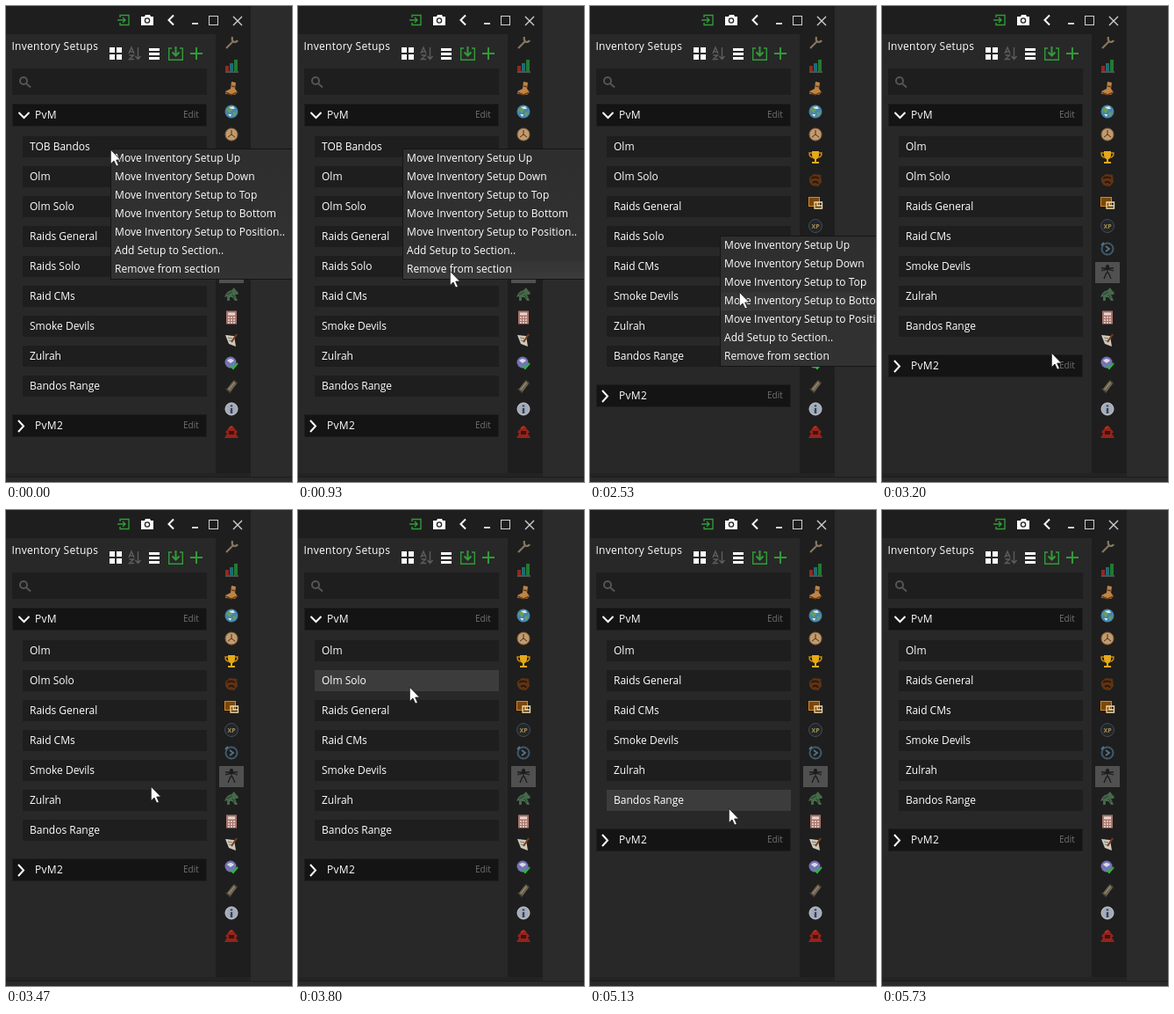
Animation of 326x541 px, one loop 6670 ms. Source, as an HTML page:

```html
<!DOCTYPE html>
<html lang="en">
<head>
<meta charset="utf-8">
<title>Inventory Setups</title>
<style>
  html, body { margin: 0; width: 100%; height: 100%; overflow: hidden; background: #282828; }
  svg { display: block; }
  text { font: 12px "Open Sans", "Noto Sans", sans-serif; fill: #fff; }
  #menu text { letter-spacing: .07px; }
  .edit { font-size: 10px; fill: #707070; }
  .line { fill: none; stroke-width: 2; }
  .thin { stroke-width: 1.4; }
  .white { stroke: #fff; }
  .green { stroke: #339a3a; }
  .head { fill: #141414; stroke: #1e1e1e; }
</style>
</head>
<body>
<svg id="stage" width="326" height="541" viewBox="0 0 326 541">
  <defs>
    <linearGradient id="menuFill" x2="0" y2="1">
      <stop stop-color="#2e2e2e"/><stop offset="1" stop-color="#323232"/>
    </linearGradient>
    <linearGradient id="pickFill" x2="0" y2="1">
      <stop stop-color="#343434"/><stop offset="1" stop-color="#3b3b3b"/>
    </linearGradient>
  </defs>

  <rect width="326" height="541" fill="#2b2b2b"/>
  <rect width="279" height="531" fill="#1e1e1e"/>
  <rect y="32" width="239" height="499" fill="#282828"/>
  <rect y="531" width="279" height="4" fill="#232323"/>
  <rect y="535" width="326" height="1" fill="#1c1c1c"/>

  <!-- title bar -->
  <path class="line thin green" d="M130 13V10.5H140V21.5H130V19M127 16H136M133 13L136 16L133 19"/>
  <path fill="#fff" d="M154 12H158L159 10H164L165 12H168V22H154Z"/>
  <circle cx="161" cy="16.500" r="2.600" fill="#fff" stroke="#1e1e1e" stroke-width="1.300"/>
  <path class="line white" d="M191 10.500L185.500 16L191 21.500"/>
  <path class="line" stroke="#d0d0d0" d="M212 20H219"/>
  <rect x="231.500" y="11.500" width="10" height="10" fill="none" stroke="#d0d0d0"/>
  <path class="line thin" stroke="#d0d0d0" d="M259 12L269 22M269 12L259 22"/>

  <!-- panel header -->
  <text x="6.500" y="50" letter-spacing=".27">Inventory Setups</text>
  <path fill="#fff" d="M118 47h6v6h-6zM126 47h6v6h-6zM118 55h6v6h-6zM126 55h6v6h-6zM163 48h12v3h-12zM163 53h12v3h-12zM163 58h12v3h-12z"/>
  <path class="line thin" stroke="#5c5c5c" d="M140 54L143 47L146 54M141 52H145M140.500 56H145.500L140.500 60.500H146M150.500 47V60M147.500 57L150.500 60.500L153.500 57"/>
  <path class="line thin green" d="M189 48H185.700V61.300H201.300V48H198"/>
  <path class="line green" d="M193.500 46V56M189.500 52.500L193.500 56.500L197.500 52.500M217 47V61M210 54H224"/>
  <rect x="7" y="71" width="222" height="30" fill="#1e1e1e"/>
  <g class="line" stroke="#555"><circle cx="20" cy="85" r="4"/><path d="M23 88L28 92.500"/></g>

  <!-- sections -->
  <g id="open">
    <rect class="head" x="7.500" y="111.500" width="221" height="25"/>
    <path class="line white" d="M14.500 121L20.500 127L26.500 121"/>
    <text x="33" y="128" letter-spacing=".3">PvM</text>
    <text class="edit" x="202" y="127">Edit</text>
  </g>
  <g id="rows"></g>
  <g id="closed">
    <rect class="head" x="7.500" y="-.5" width="221" height="25"/>
    <path class="line white" d="M14 6L20 12.500L14 19"/>
    <text x="33" y="16" letter-spacing=".3">PvM2</text>
    <text class="edit" x="202" y="15">Edit</text>
  </g>

  <rect x="243" y="291" width="28" height="24" fill="#505050"/>
  <g id="tools"></g>

  <g id="menu">
    <rect x=".5" y="-.5" width="215" height="148" fill="url(#menuFill)" stroke="#151515"/>
    <rect id="pick" x="1" width="214" height="21" fill="url(#pickFill)"/>
  </g>
  <path id="cursor" fill="#fff" stroke="#161616" stroke-width=".8" d="M.3 .3V16.500L4 13L6.800 19L9.400 18L6.700 12H11.600Z"/>
</svg>

<script>
const NS = "http://www.w3.org/2000/svg";
const TICK = 200 / 3, LOOP = 6670;
const PITCH = 34, ROW_TOP = 148, ROW_H = 24, ITEM_H = 21;
const $ = id => document.getElementById(id);

function add(parent, tag, attrs, label) {
  const el = document.createElementNS(NS, tag);
  for (const k in attrs) el.setAttribute(k, attrs[k]);
  if (label) el.textContent = label;
  parent.append(el);
  return el;
}
const place = (el, x, y) => el.setAttribute("transform", `translate(${x} ${y})`);
const show = (el, on) => el.setAttribute("visibility", on ? "visible" : "hidden");

const setups = ["TOB Bandos", "Olm", "Olm Solo", "Raids General", "Raids Solo",
  "Raid CMs", "Smoke Devils", "Zulrah", "Bandos Range"];
const removals = { "TOB Bandos": 22, "Raids Solo": 48, "Olm Solo": 68 };
const actions = ["Move Inventory Setup Up", "Move Inventory Setup Down", "Move Inventory Setup to Top",
  "Move Inventory Setup to Bottom", "Move Inventory Setup to Position..", "Add Setup to Section..",
  "Remove from section"];

// open tick, close tick, x, y
const menus = [[0, 22, 119, 163], [35, 48, 148, 262], [58, 68, 127, 204]];

// tick, x, y of the pointer
const path = [[0, 119, 163], [3, 119, 163], [14, 173, 301], [26, 173, 301], [28, 147, 275],
  [31, 147, 275], [33, 148, 262], [35, 148, 262], [41, 192, 387], [44, 193, 394], [48, 193, 394],
  [57, 127, 201], [58, 127, 204], [62, 181, 334], [71, 181, 334], [74, 168, 312], [79, 152, 354],
  [81, 148, 347], [85, 70, 528], [86, 60, 560], [100, 60, 560]];

// small sidebar drawings, each centred on 0,0
const tools = [
  `<path d="M-6 6L2-2M1-7Q0-2 3-1Q6-1 7-3" stroke="#85775f" stroke-width="2.200" fill="none"/>`,
  `<path d="M-7 0h4v6h-4z" fill="#8f2a20"/><path d="M-2-3h4v9h-4z" fill="#1f6a78"/><path d="M3-7h4v13h-4z" fill="#217a30"/><path d="M-7 7H8" stroke="#7c8a84"/>`,
  `<path d="M0-8L5-7L4 0L7 4L4 7L-7 6L-7 3L-1 0Z" fill="#bd8446"/><path d="M-7 4L0 7L7 4M0-3L5-2" stroke="#6b3d18" stroke-width="1.500" fill="none"/>`,
  `<circle r="7.500" fill="#4187b0"/><path d="M-6-2L-2-6L1-2L-2 2ZM2 1L6 0L4 5L1 5Z" fill="#6f9a5c"/><path d="M-3-5L2-6L4-3L0-3ZM-4 3L0 3L-1 6Z" fill="#dce8ea"/>`,
  `<circle r="7" fill="#c29a6c" stroke="#8a6440"/><path d="M0-5V0L4 3M0 0L-4 3" stroke="#4a2e1a" fill="none"/>`,
  `<path d="M-4-7H4V-2Q3 2 1 2V5H4V7H-4V5H-1V2Q-3 2-4-2Z" fill="#e3aa17"/><path d="M-4-5H-7Q-7 0-3 0M4-5H7Q7 0 3 0" fill="none" stroke="#c58a10" stroke-width="1.500"/>`,
  `<path d="M-7-3L-2-7L6-6L7 2L3 7L-4 6L-7 2Z" fill="#5f3315"/><path d="M-5-2Q0-5 4-2M-3 3Q1 0 3 4" stroke="#2e180a" stroke-width="2" fill="none"/>`,
  `<rect x="-7.500" y="-6.500" width="12" height="10" fill="#7d4708" stroke="#e0871a"/><path d="M-1-1H7.500V6H-1ZM2-1V3H7" fill="none" stroke="#f2dca8" stroke-width="1.300"/>`,
  `<circle r="7.500" fill="#20262e" stroke="#454c55"/><text y="2.500" text-anchor="middle" style="font-size:7px;font-weight:700;fill:#a98f4c">XP</text>`,
  `<circle r="6.500" fill="none" stroke="#40596a" stroke-width="2"/><path d="M-2-3L2 0L-2 3M-7-4L-4-7" fill="none" stroke="#587488" stroke-width="1.800"/>`,
  `<circle cy="-6" r="2" fill="#1b1b1b"/><path d="M-7-4H7M0-4V2M-4 8L-1 1M4 8L1 1M-7-1L0-3L7-1" stroke="#1b1b1b" stroke-width="1.300" fill="none"/>`,
  `<path d="M-8 3Q-6-4 0-5L3-8L5-5L8-2L7 0L4 0L7 7H4L1 3L-2 3L-2 7H-5L-5 2Z" fill="#45694a"/><path d="M-5 0L1-3M1 0L4 4" stroke="#263d2a"/>`,
  `<rect x="-6" y="-7.500" width="12" height="15" fill="#a8746c"/><rect x="-4" y="-5.500" width="8" height="3" fill="#e4d6cf"/><path d="M-4 0H4M-4 3H4M-4 6H4" stroke="#ecdad2" stroke-width="1.600" stroke-dasharray="2 1"/>`,
  `<path d="M-7-6L3-5L5 7L-3 4Z" fill="#cfc9ba"/><path d="M-4-3L1-2M-3 0L2 1" stroke="#77736c"/><path d="M6-7L0 2" stroke="#7a3f20" stroke-width="2"/>`,
  `<circle cx="-1" cy="-1" r="6.500" fill="#7474b4"/><path d="M-5-3Q-1-7 3-3L-1 0Z" fill="#d9d9ee"/><path d="M-1 3L2 6L7 0" fill="none" stroke="#2cb83c" stroke-width="2"/>`,
  `<path d="M-6 4L3-7L7-4L-2 8Z" fill="#6c6250"/><path d="M-3 4L4-5" stroke="#a79b80"/><path d="M-7 3L-1 8M2-7L7-3" stroke="#39332a" stroke-width="1.500"/>`,
  `<circle r="7" fill="#a4abb8" stroke="#c6cad2"/><path d="M0-4.500V-2.500M0-1V5" stroke="#34405c" stroke-width="2.400"/>`,
  `<path d="M-4-3Q0-11 4-3L7 0L5 2L8 7H-8L-5 2L-7 0Z" fill="#96231a"/><path d="M-3-1H3V3H-3Z" fill="#40120c"/><path d="M-3-4L1-6" stroke="#c0402e"/>`
];
tools.forEach((art, i) => {
  const g = add($("tools"), "g", {});
  g.innerHTML = art;
  place(g, 257, 42 + 26 * i);
});

const rows = setups.map(name => {
  const g = add($("rows"), "g", {});
  const box = add(g, "rect", { x: 19, width: 210, height: ROW_H });
  add(g, "text", { x: 27, y: 16 }, name);
  return { name, g, box };
});
actions.forEach((a, i) => add($("menu"), "text", { x: 5, y: 14 + ITEM_H * i }, a));

function pointer(n) {
  const i = path.findIndex(p => p[0] > n);
  const [t0, x0, y0] = path[i - 1], [t1, x1, y1] = path[i];
  const u = (n - t0) / (t1 - t0), e = u * u * (3 - 2 * u);
  return [x0 + (x1 - x0) * e, y0 + (y1 - y0) * e].map(Math.round);
}

function draw(n) {
  const [px, py] = pointer(n);
  const menu = menus.find(m => n >= m[0] && n < m[1]);
  const canHover = !menu && n !== 22 && px > 18 && px < 229;

  let count = 0;
  for (const { name, g, box } of rows) {
    const live = !(n >= removals[name]);
    show(g, live);
    if (!live) continue;
    const y = ROW_TOP + PITCH * count++;
    place(g, 0, y);
    const over = canHover && py >= y && py < y + ROW_H;
    box.setAttribute("fill", over ? "#3c3c3c" : "#1e1e1e");
  }
  place($("closed"), 0, 159 + PITCH * count);

  show($("menu"), menu);
  show($("pick"), false);
  if (menu) {
    place($("menu"), menu[2], menu[3]);
    const item = Math.floor((py - menu[3]) / ITEM_H);
    show($("pick"), item > 0 && item < actions.length);
    $("pick").setAttribute("y", item * ITEM_H);
  }
  place($("cursor"), px, py);
}

let start, last = -1;
function tick(now) {
  start ??= now;
  const n = Math.min(99, Math.floor(((now - start) % LOOP + 5) / TICK));
  if (n !== last) draw(last = n);
  requestAnimationFrame(tick);
}
draw(0);
requestAnimationFrame(tick);
</script>
</body>
</html>
```
